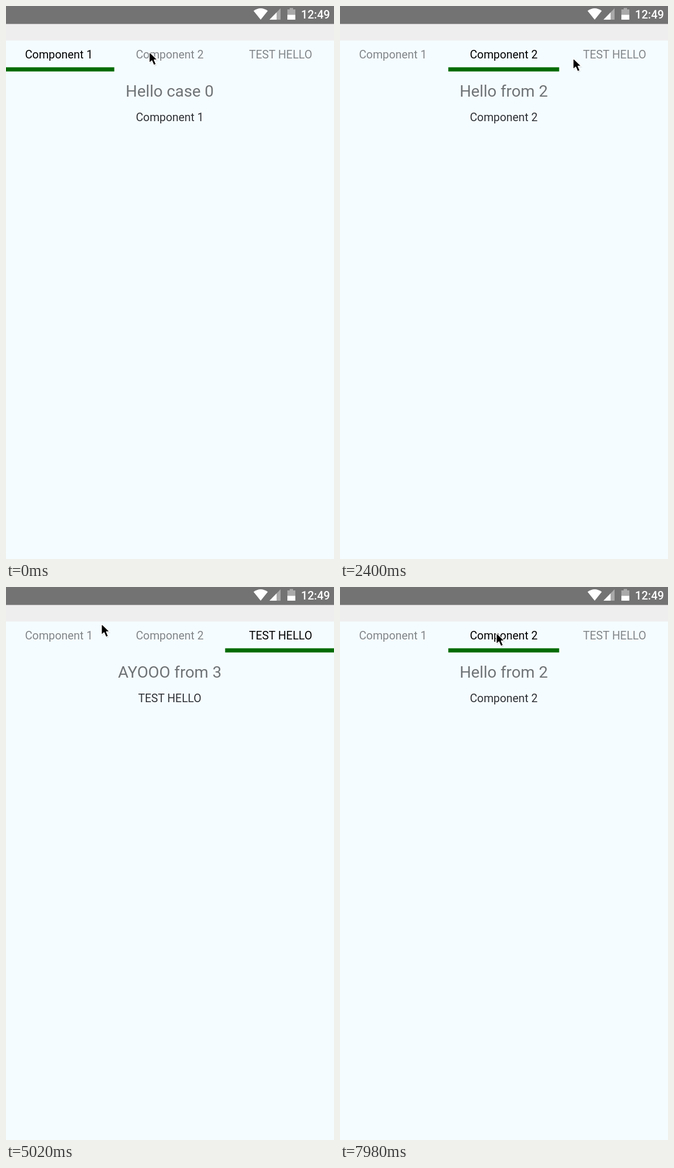
Animation, 577 px wide and 970 px high, one loop 8 s. Source, as an HTML page:

```html
<!DOCTYPE html>
<html lang="en">
<head>
<meta charset="utf-8">
<title>Tabs</title>
<style>
  html, body { margin: 0; width: 100%; height: 100%; overflow: hidden; background: #f5fcff; }
  svg { display: block; width: 100%; height: 100%; font-family: Roboto, sans-serif; }
  text { text-anchor: middle; font-size: 19.85px; fill: #818588; }
  .active { fill: #000; }
  .sub { fill: #2e3135; }
  .title { font-size: 28.3px; fill: #6f7375; }
  .clock { font-size: 20px; font-weight: 500; fill: #fff; }
</style>
</head>
<body>
<svg viewBox="0 0 577 970">
  <rect width="577" height="970" fill="#f5fcff"/>
  <rect y="31" width="577" height="29.5" fill="#efeeee"/>
  <rect width="577" height="31.5" fill="#737373"/>

  <g fill="#fff">
    <path d="M435.5 8.5Q448 -.5 460.5 8.5L448 24Z"/>
    <path d="M463.5 24H483V4Z" fill="#a9a9a9"/>
    <path d="M463.5 24H476V11.2Z"/>
    <path d="M495 6H499V3.5H505V6H509V16H495Z" fill="#a9a9a9"/>
    <path d="M495 15.5H509V24H495Z"/>
  </g>
  <text class="clock" x="544.5" y="22">12:49</text>

  <g id="tabs"></g>
  <rect id="bar" y="107.5" height="7.3" fill="#006b00"/>
  <text id="title" class="title" x="288" y="159"></text>
  <text id="sub" class="sub" x="288" y="202"></text>

  <g id="cursor">
    <path d="M1 2V21L5.5 17L9 25L13 23.5L9.5 16H16Z" opacity=".13"/>
    <path d="M0 0V19.5L4.6 15.4L8 23.3L11.9 21.6L8.6 14H14.5Z"
      stroke="#fff" stroke-width="1.3" stroke-linejoin="round"/>
  </g>
</svg>
<script>
const LOOP = 8000, MIDDLE = 288, PITCH = 195;
const $ = id => document.getElementById(id);

const pages = [
  { label: 'Component 1', title: 'Hello case 0' },
  { label: 'Component 2', title: 'Hello from 2' },
  { label: 'TEST HELLO', title: 'AYOOO from 3' }
];
const tabX = i => MIDDLE + (i - 1) * PITCH;

// Where the pointer passes; a stop with a page taps that tab
const stops = [
  { t: 400, x: 252, y: 80.5, page: 1 },
  { t: 1520, x: 338, y: 95.5 },
  { t: 2400, x: 410, y: 91.5 },
  { t: 3550, x: 462, y: 87, page: 2 },
  { t: 4080, x: 352, y: 71.5 },
  { t: 5020, x: 168, y: 64.5 },
  { t: 6050, x: 98, y: 82, page: 0 },
  { t: 6700, x: 224, y: 80.5 },
  { t: 7720, x: 275, y: 80.5, page: 1 }
];

const labels = pages.map((page, i) => {
  const el = document.createElementNS('http://www.w3.org/2000/svg', 'text');
  el.setAttribute('x', tabX(i));
  el.setAttribute('y', 92);
  el.textContent = page.label;
  return $('tabs').appendChild(el);
});

function pointer(t) {
  const next = stops.find(s => s.t > t) || stops[stops.length - 1];
  const prev = stops[stops.indexOf(next) - 1] || next;
  const k = Math.min(1, (t - prev.t) / (next.t - prev.t || 1));
  const mix = key => prev[key] + (next[key] - prev[key]) * k;
  return [mix('x'), mix('y')];
}

function activePage(t) {
  const taps = stops.filter(s => s.t <= t && 'page' in s);
  return taps.length ? taps[taps.length - 1].page : 0;
}

function draw(t) {
  const active = activePage(t);
  labels.forEach((el, i) => el.classList.toggle('active', i === active));
  $('bar').setAttribute('x', tabX(active) - PITCH / 2);
  $('bar').setAttribute('width', PITCH);
  $('title').textContent = pages[active].title;
  $('sub').textContent = pages[active].label;
  $('cursor').setAttribute('transform', `translate(${pointer(t)})`);
}

const start = performance.now();
function tick() {
  draw((performance.now() - start) % LOOP);
  requestAnimationFrame(tick);
}
draw(0);
requestAnimationFrame(tick);
</script>
</body>
</html>
```
